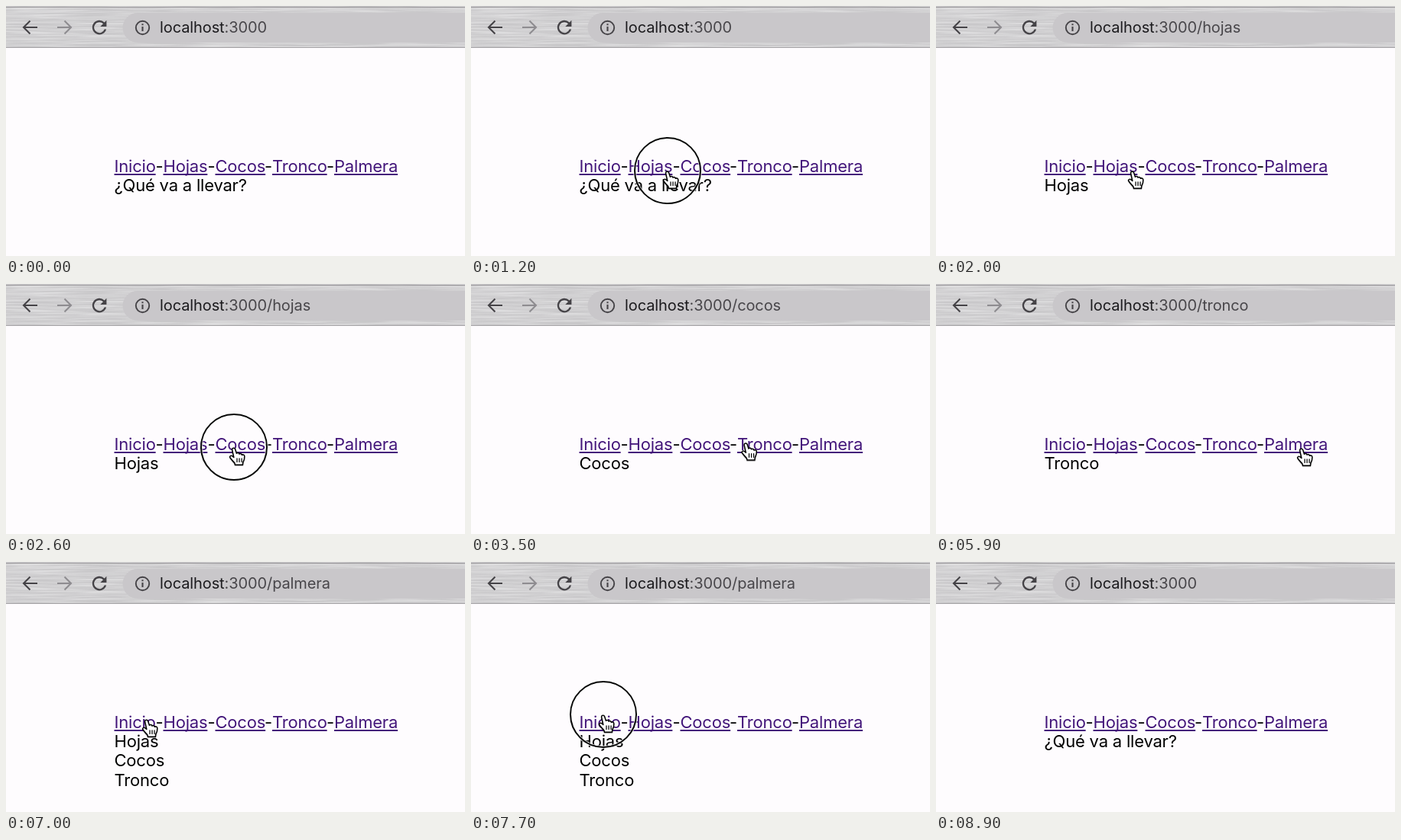
Recreate the animation shown at these times as an HTML page. Size 600 by 328 pixels, loop 9.5 s.

```html
<!DOCTYPE html>
<html lang="es">
<head>
<meta charset="utf-8">
<title>Palmera</title>
<style>
  html, body { margin: 0; width: 100%; height: 100%; overflow: hidden; background: #fefcfe; }
  #stage { position: relative; width: 600px; height: 328px; overflow: hidden; font-family: Inter, sans-serif; }
  svg { position: absolute; left: 0; top: 0; }
  .line { position: absolute; font-size: 22px; line-height: 25.5px; letter-spacing: -.2px; white-space: pre; color: #000; }
  .link { color: #43167a; text-decoration: underline; text-decoration-thickness: 1.5px; text-underline-offset: 2px; text-decoration-skip-ink: none; }
  #nav { position: absolute; left: -.5px; top: 198px; }
  #content { left: 141.5px; top: 222.75px; }
  #address { font-size: 20px; letter-spacing: -.1px; fill: #48464a; }
  #host { fill: #1c1b1e; }
  #hand { filter: drop-shadow(.5px 1px .8px #0005); }
</style>
</head>
<body>
<div id="stage">
  <svg width="600" height="56" fill="none">
    <filter id="brushed" x="0" y="0" width="100%" height="100%">
      <feTurbulence type="fractalNoise" baseFrequency=".012 .55" numOctaves="3" seed="7"/>
      <feColorMatrix values="0 0 0 0 1  0 0 0 0 1  0 0 0 0 1  2.4 0 0 0 -.8"/>
    </filter>
    <rect width="600" height="54" fill="#c9c8ca"/>
    <rect width="600" height="54" filter="url(#brushed)" opacity=".4"/>
    <path d="M0 1.5H600" stroke="#979598"/>
    <path d="M0 54.5H600" stroke="#a3a1a4"/>
    <rect x="152.5" y="9" width="480" height="39" rx="19.5" fill="#c9c7ca"/>
    <g stroke="#454347" stroke-width="2.1">
      <path d="M41 28H23.5M31.5 19.5L23 28l8.5 8.5"/>
      <path d="M67 28H84.5M76.5 19.5L85 28l-8.5 8.5" stroke="#8e8c90"/>
      <path transform="translate(108.2 14.2) scale(1.16)" fill="#454347" stroke="none"
        d="M17.65 6.35A8 8 0 1 0 19.73 14h-2.08A6 6 0 1 1 16.22 7.78L13 11h7V4z"/>
      <circle cx="178.5" cy="28.5" r="8.7" stroke-width="1.9"/>
      <path d="M178.500 27v6M178.500 23.300v2"/>
    </g>
    <text id="address" x="201" y="35.3"><tspan id="host">localhost</tspan>:3000<tspan id="route"></tspan></text>
  </svg>
  <div id="nav"></div>
  <div id="content" class="line"></div>
  <svg width="600" height="328">
    <g id="pointer">
      <g id="ring" fill="none">
        <circle r="43" stroke="#fff" stroke-width="4" opacity=".7"/>
        <circle r="43" stroke="#080808" stroke-width="2"/>
      </g>
      <g id="hand" transform="translate(0 1.5) scale(.95)" stroke="#000" stroke-width="1.6" stroke-linejoin="round" stroke-linecap="round">
        <path fill="#fff" d="M-2.6 1.8C-2.6-.6 1-.9 1.7 1.2L3.6 7C5 5.6 7 6.4 7.3 8 8.8 6.8 10.6 7.6 11 9.2 12.8 8.2 14.4 9.4 14.5 11.2 14.8 15 13.6 17 12.4 19.4L12 23H1.6L1 20.6C-1 18-3.5 16-5.6 12.6-6.4 10.8-4 9.6-2.4 10.8L-.2 12.6Z"/>
        <path d="M4.2 14v5M7.4 14v5M10.6 14v5" stroke-width="1.3"/>
      </g>
      <path id="arrow" d="M0 0V18.5L4.3 14.5 7.2 21.5 10.2 20.2 7.4 13.4H13Z" stroke="#fff" stroke-width="1.3"/>
    </g>
  </svg>
</div>
<script>
const LOOP = 9500, STEP = 100;
const get = id => document.getElementById(id);
const [nav, content, route, pointer, ring, hand, arrow] =
  ['nav', 'content', 'route', 'pointer', 'ring', 'hand', 'arrow'].map(get);

const links = [['Inicio', 142], ['Hojas', 206], ['Cocos', 274], ['Tronco', 348.5], ['Palmera', 429.5]];

function addText(text, x, className) {
  const el = document.createElement('span');
  el.className = className;
  el.textContent = text;
  el.style.left = x + 'px';
  nav.append(el);
}
links.forEach(([name, x], i) => {
  if (i) addText('-', x - 10, 'line');
  addText(name, x, 'line link');
});

// The content changes first, the address one step later.
const home = '¿Qué va a llevar?';
const pages = [
  [0, home, ''],
  [1300, 'Hojas', '/hojas'],
  [2700, 'Cocos', '/cocos'],
  [4200, 'Tronco', '/tronco'],
  [6000, 'Hojas\nCocos\nTronco', '/palmera'],
  [7800, home, '']
];
const clicks = [1200, 2600, 7700];

// Moves: start, end, target x, target y, upward arc
const entry = { x: 84, y: 301 };
const moves = [
  [100, 900, 257, 216, 0],
  [2000, 2500, 298, 214, 0],
  [3100, 3900, 380, 215, 7],
  [4700, 5500, 478, 215, 4],
  [6000, 6700, 184, 206, 0],
  [7100, 7600, 173, 200, 0],
  [8000, 8200, 190, 296, 0]
];

function pointerAt(t) {
  let { x, y } = entry;
  for (const [start, end, toX, toY, arc] of moves) {
    if (t <= start) break;
    const u = Math.min(1, (t - start) / (end - start));
    const eased = 1 - (1 - u) ** 2;
    x += (toX - x) * eased;
    y += (toY - y) * eased - arc * Math.sin(Math.PI * u);
  }
  return { x, y };
}

const pageAt = t => pages.findLast(([start]) => start <= t);
const show = (el, on) => el.setAttribute('visibility', on ? 'visible' : 'hidden');

function draw(now) {
  const t = Math.floor((now % LOOP) / STEP) * STEP;
  content.textContent = pageAt(t)[1];
  route.textContent = pageAt(Math.max(0, t - STEP))[2];

  const { x, y } = pointerAt(t);
  const present = t >= 100 && t < 8300;
  const overLinks = y < 222;
  pointer.setAttribute('transform', `translate(${x} ${y})`);
  show(hand, present && overLinks);
  show(arrow, present && !overLinks);
  show(ring, clicks.includes(t));
  requestAnimationFrame(draw);
}
draw(performance.now());
</script>
</body>
</html>
```
